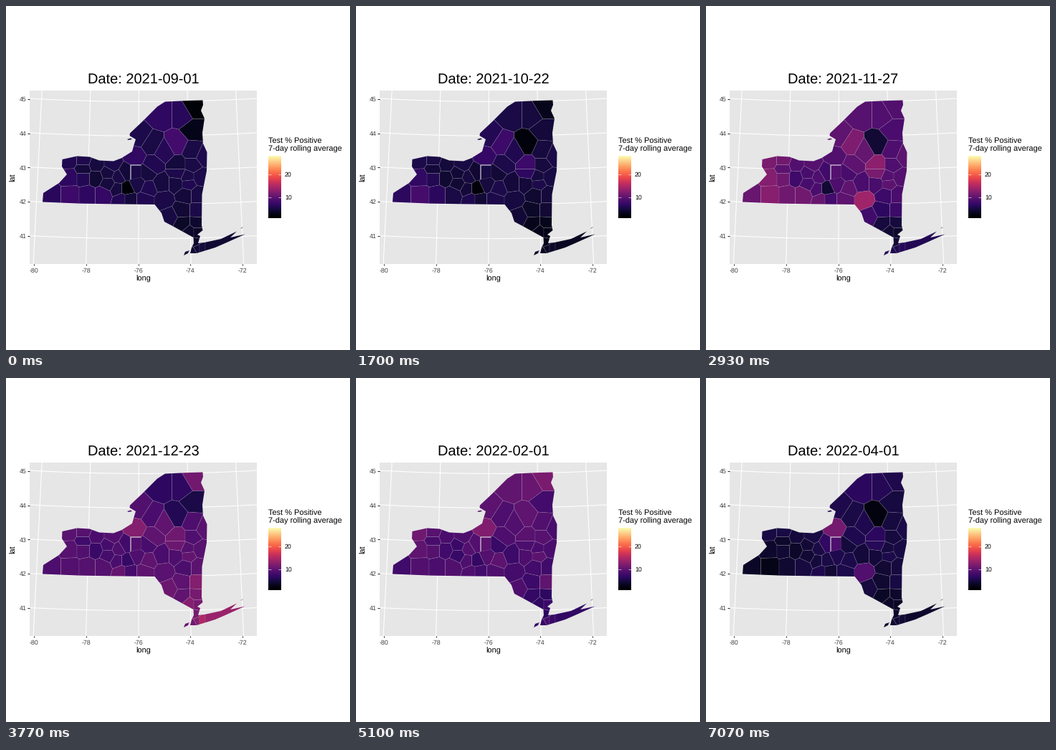
A matplotlib script for the animation above (7.1 s loop, 480 by 480 pixels).

```python
import matplotlib.pyplot as plt
import numpy as np
from matplotlib.animation import FuncAnimation
from matplotlib.collections import PolyCollection
from matplotlib.colors import ListedColormap
from matplotlib.patches import Rectangle
from matplotlib.path import Path

SIZE, DPI = 480, 96
LOOP_MS, DAYS = 7100, 213
START = np.datetime64("2021-09-01")
LOW, HIGH = 0.95, 28

plt.rcParams["font.family"] = "Liberation Sans"
plt.rcParams["text.hinting"] = "none"

# Magma, darkened from display gamma 1.8 to 2.2
magma = plt.get_cmap("magma")(np.linspace(0, 1, 256))[:, :3]
cmap = ListedColormap(magma ** (2.2 / 1.8))

# County centres: one row of x positions per y
ROWS = {
    143: [262], 152: [216, 247], 172: [262], 182: [186], 193: [203, 238],
    203: [221, 260], 210: [180, 276], 215: [89, 108],
    222: [126, 148, 205, 240, 260], 228: [108], 233: [142, 167, 180, 197, 240],
    239: [90, 108, 125, 157, 253, 271], 248: [143, 183, 217, 238, 254],
    255: [155, 168, 199], 263: [62, 91, 113, 136, 250, 267],
    270: [161, 171, 194, 220], 286: [245, 268], 294: [229], 303: [246, 267],
    316: [257, 267], 331: [258, 264], 338: [267, 273, 283], 342: [260], 347: [251],
}
centres = np.array([(x, y) for y, xs in ROWS.items() for x in xs], float)

MAINLAND = [
    (51, 273.5), (52, 261), (74, 247), (85, 235), (78, 224), (78.5, 214), (99, 209.5),
    (116.5, 210.5), (130, 215.5), (150, 216.5), (161, 212.3), (176, 203), (178.5, 194),
    (181, 186), (172.5, 181), (173, 177.5), (190, 161.5), (202, 149.5), (211, 140.5),
    (222, 133.5), (250, 132.2), (274.5, 131.5), (275, 138), (272, 146), (277, 157),
    (274, 177), (275, 192), (280.5, 204), (280, 230), (273.5, 263), (273, 306),
    (274.5, 313), (267, 319), (271, 321), (268, 331), (277, 330), (300, 325),
    (322, 314.5), (313, 323), (333.5, 318.5), (308, 330), (292, 337), (266, 345),
    (257, 345), (259, 337), (262, 331), (261.5, 323), (231.5, 306.5), (221, 301),
    (217, 289), (207.5, 277), (150, 276.4), (102, 275.6),
]
ISLANDS = [
    [(248, 348), (250, 343), (256, 341), (254, 345)],
    [(169, 186), (174, 184.5), (176, 186), (171, 187)],
    [(327, 310.5), (331, 308), (329, 310)],
]

# Local trouble spots: x, y, reach
SPOTS = dict(
    southwest=(85, 262, 28), northwest=(97, 222, 22), corning=(130, 263, 13),
    lakeshore=(182, 206, 15), lewis=(200, 190, 14), syracuse=(175, 234, 12),
    north=(230, 152, 30), clinton=(262, 143, 9), essex=(262, 172, 9),
    hamilton=(238, 193, 10), mohawk=(240, 225, 8), catskill=(220, 270, 9),
    ithaca=(168, 255, 7), downstate=(262, 318, 40), island=(280, 338, 9),
)

# Statewide positivity
WAVE_DAY = [0, 51, 75, 88, 113, 122, 128, 134, 150, 178, 195, 212]
WAVE = [5.3, 5, 7, 9.5, 9.3, 16, 21, 18, 9.5, 4, 2.8, 5]

rng = np.random.default_rng(7)
noise = rng.normal(1, 0.08, len(centres))
phase = rng.uniform(0, 2 * np.pi, len(centres))


def wave(day):
    return np.interp(day, WAVE_DAY, WAVE)


def survey(day, **points):
    """County positivity relative to the wave, given each spot's excess in points."""
    excess = np.zeros(len(centres))
    for name, amount in points.items():
        *spot, reach = SPOTS[name]
        dist = np.hypot(*(centres - spot).T)
        excess += amount * np.exp(-((dist / reach) ** 2))
    return day, np.maximum(1 + excess / wave(day), 0.2) * noise


survey_days, ratios = zip(
    survey(0, southwest=2.5, corning=2, lakeshore=2, north=1.5, hamilton=2.5,
           clinton=-4, essex=-2.5, ithaca=-3.5, downstate=-1.5),
    survey(51, southwest=3.5, lakeshore=2.5, lewis=3.5, hamilton=-3, mohawk=4,
           clinton=-2, ithaca=-3, downstate=-2.3),
    survey(88, southwest=3.5, northwest=2.5, corning=2, lewis=4, hamilton=-5,
           mohawk=6, catskill=5, ithaca=-5, downstate=-5.5),
    survey(113, north=-3.5, clinton=3, essex=-3, hamilton=-3, lakeshore=4, mohawk=3.5,
           ithaca=-2, downstate=2.5, island=4),
    survey(134, northwest=4, southwest=1.5, corning=-5, lakeshore=5.5, north=-5,
           clinton=5, essex=-7, mohawk=4, ithaca=-9, downstate=-1.5),
    survey(178, north=3, essex=1.5, lakeshore=3, syracuse=1.5, corning=2, downstate=-1.7),
    survey(212, lakeshore=7.5, syracuse=4.5, catskill=4, north=1.5, hamilton=-3,
           mohawk=2.5, southwest=-2.3, downstate=-1.3),
)


def colors(day):
    k = min(np.searchsorted(survey_days, day, "right"), len(survey_days) - 1)
    d0, d1 = survey_days[k - 1:k + 1]
    f = (day - d0) / (d1 - d0)
    ratio = (1 - f) * ratios[k - 1] + f * ratios[k]
    wobble = 1 + 0.1 * np.sin(np.pi * f) * np.sin(day / 4 + phase)
    return cmap((wave(day) * ratio * wobble - LOW) / (HIGH - LOW))


def cut(poly, mid, normal):
    """Keep the part of a convex polygon behind a line."""
    side = (poly - mid) @ normal
    kept = []
    for a, b, s, t in zip(poly, np.roll(poly, -1, 0), side, np.roll(side, -1)):
        if s <= 0:
            kept.append(a)
        if s * t < 0:
            kept.append(a + (b - a) * s / (s - t))
    return np.array(kept)


def cell(i):
    """The area closer to centre i than to any other."""
    poly = np.array([(0, 100), (SIZE, 100), (SIZE, 370), (0, 370)], float)
    for j, other in enumerate(centres):
        if j != i:
            poly = cut(poly, (centres[i] + other) / 2, other - centres[i])
    return poly


def project(lon, lat):
    """Conic projection in stage pixels."""
    r = 3008.4 - 47.8 * (lat - 42)
    a = 0.011858 * (lon + 75.82)
    return 191.5 + r * np.sin(a), r * np.cos(a) - 2731.6


def label(x, y, s, px, color="black", **kw):
    return ax.text(x, y, s, fontsize=px * 72 / DPI, color=color, **kw)


def line(x, y, color, px, **kw):
    return ax.plot(x, y, color=color, lw=px * 72 / DPI, **kw)[0]


fig = plt.figure(figsize=(SIZE / DPI, SIZE / DPI), dpi=DPI, facecolor="white")
ax = fig.add_axes([0, 0, 1, 1])

# Legend
ax.imshow(np.linspace(1, 0, 300)[:, None], cmap=cmap, aspect="auto",
          extent=(366.4, 383.6, 296, 209.6), interpolation="bilinear")
for v in (10, 20):
    y = 296 - 86.4 * (v - LOW) / (HIGH - LOW)
    for x in (366.4, 380.2):
        line([x, x + 3.4], [y, y], "white", 0.6, solid_capstyle="butt")
    label(389, y + 3.1, str(v), 8.8)
label(366, 191.8, "Test % Positive", 11)
label(366, 203, "7-day rolling average", 11)

# Panel and graticule
panel = Rectangle((33.2, 118.2), 316.4, 241.4, fc="#e6e6e6", ec="none", zorder=0)
ax.add_patch(panel)
lats, lons = np.linspace(40, 45.6, 60), np.linspace(-80.6, -71, 60)
grid = [project(lon, lats) for lon in range(-80, -71, 2)]
grid += [project(lons, lat) for lat in range(41, 46)]
for x, y in grid:
    line(x, y, "white", 1.1, zorder=1).set_clip_path(panel)

# Axes
for i in range(5):
    x, y = 39 + 72.75 * i, 129.6 + 47.9 * i
    line([x, x], [359.6, 362.4], "#2a2a2a", 1.07, solid_capstyle="butt")
    line([30.4, 33.2], [y, y], "#2a2a2a", 1.07, solid_capstyle="butt")
    label(x, 372.3, str(2 * i - 80), 8.8, "#404040", ha="center")
    label(28.3, y + 3.2, str(45 - i), 8.8, "#404040", ha="right")
label(191.5, 383.8, "long", 11, ha="center")
label(9.8, 239, "lat", 11, rotation=90, ha="center", va="center")

# Counties, trimmed to the state's outline
counties = PolyCollection([cell(i) for i in range(len(centres))], facecolors=colors(0),
                          edgecolors=[(0.9, 0.9, 0.9, 0.16)], linewidths=0.5, zorder=2)
ax.add_collection(counties, autolim=False)
outline = Path.make_compound_path(
    *[Path(ring + ring[:1], closed=True) for ring in [MAINLAND, *ISLANDS]])
counties.set_clip_path(outline, ax.transData)

title = label(191.5, 108.8, "", 20, ha="center")
ax.set(xlim=(0, SIZE), ylim=(SIZE, 0))
ax.axis("off")


def update(day):
    title.set_text(f"Date: {START + int(day)}")
    counties.set_facecolor(colors(day))
    return title, counties


anim = FuncAnimation(fig, update, frames=DAYS, interval=LOOP_MS / DAYS,
                     repeat=True, repeat_delay=0)
plt.show()
```
